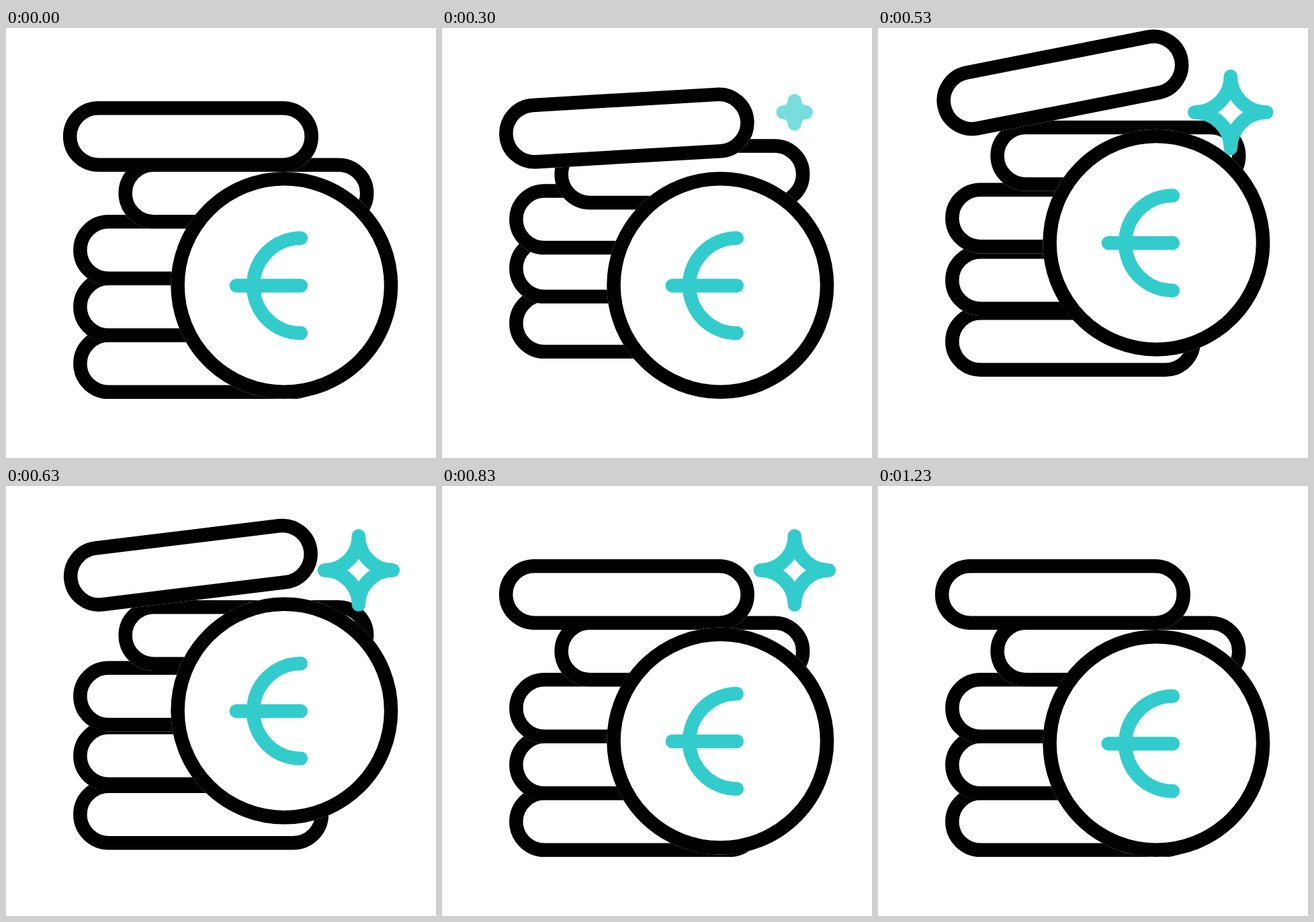
An HTML page for the animation above (1.67 s loop, 640 by 640 pixels).

```html
<!DOCTYPE html>
<html lang="en">
<head>
<meta charset="utf-8">
<title>Euro coins</title>
<style>
html, body { margin: 0; width: 100%; height: 100%; overflow: hidden; background: #fff; }
svg { display: block; width: 100%; height: 100%; }
.line { fill: none; stroke: #000; stroke-width: 20.5; }
.teal { fill: none; stroke: #3cc; stroke-width: 20.5; stroke-linecap: round; stroke-linejoin: round; }
</style>
</head>
<body>
<svg viewBox="0 0 640 640">
  <g id="stack"></g>
  <g id="coin">
    <circle cx="414.3" cy="383" r="169" fill="#fff"/>
    <circle cx="414.3" cy="383" r="158.75" class="line"/>
    <path class="teal" d="M438.8 312.7A70.6 70.6 0 0 0 438.8 454.1M342.8 383.4H438.8"/>
  </g>
  <path id="star" class="teal"/>
</svg>
<script>
const LOOP = 1670, FPS = 30;
const NS = "http://www.w3.org/2000/svg";
const byId = id => document.getElementById(id);
const stack = byId("stack"), coin = byId("coin"), star = byId("star");

const smooth = x => (1 - Math.cos(Math.PI * x)) / 2;
const linear = x => x;

// keys: [frame, value] pairs in order of time
function track(f, keys, ease = smooth) {
  if (f <= keys[0][0]) return keys[0][1];
  for (let i = 1; i < keys.length; i++) {
    const [a, u] = keys[i - 1], [b, v] = keys[i];
    if (f <= b) return u + (v - u) * ease((f - a) / (b - a));
  }
  return keys[keys.length - 1][1];
}

function add(parent, name, attrs) {
  const el = document.createElementNS(NS, name);
  for (const k in attrs) el.setAttribute(k, attrs[k]);
  return parent.appendChild(el);
}

function box(parent, w, h, attrs) {
  add(parent, "rect", { x: -w / 2, y: -h / 2, width: w, height: h, rx: h / 2, ...attrs });
}

// bottom bar first, so each one overlaps the bar below it
const bars = [290.1, 290.1, 290.1, 357.4, 274.9].map((x, i) => {
  const g = add(stack, "g", {});
  box(g, 380, 105, { fill: "#fff" });
  box(g, 359.5, 84.5, { class: "line" });
  const top = i === 4;
  const start = top ? 7.15 : 0.5 + 1.55 * i;
  const rise = top ? 7.2 : 8;
  const lift = top ? 80 : 60;
  return {
    g, x, y: 499.6 - 84.55 * i,
    jump: [[start, 0], [start + rise, -lift], [10.5 + 1.4 * i, -lift], [22.25, 0]],
    tilt: top ? [[6, 0], [16.1, -11.25], [23.7, 0]] : [[0, 0]]
  };
});

const coinJump = [[10.17, 0], [16.67, -65], [23.6, 0], [28, -15], [32, 0]];
const starSize = [[7, 0], [13, 68], [17, 51], [29, 51], [32, 68], [37, 0]];
const starFade = [[7, 0], [10, 1], [34, 1], [37, 0]];

function starPath(s) {
  const arc = `A${s} ${s} 0 0 0 `;
  const x = 524.8, y = 125.5;
  return `M${x} ${y - s}${arc}${x + s} ${y}${arc}${x} ${y + s}${arc}${x - s} ${y}${arc}${x} ${y - s}Z`;
}

function draw(ms) {
  // whole frames at 30 per second, timed in hundredths of a second
  const f = Math.floor((Math.floor((ms % LOOP) / 10) + 0.5) * FPS / 100);
  for (const b of bars) {
    const y = b.y + track(f, b.jump);
    b.g.setAttribute("transform", `translate(${b.x} ${y}) rotate(${track(f, b.tilt, linear)})`);
  }
  coin.setAttribute("transform", `translate(0 ${track(f, coinJump)})`);
  const fade = track(f, starFade, linear);
  star.setAttribute("visibility", fade > 0 ? "visible" : "hidden");
  star.setAttribute("opacity", fade);
  star.setAttribute("d", starPath(track(f, starSize)));
}

const t0 = performance.now();
function tick() {
  draw(performance.now() - t0);
  requestAnimationFrame(tick);
}
draw(0);
requestAnimationFrame(tick);
</script>
</body>
</html>
```
